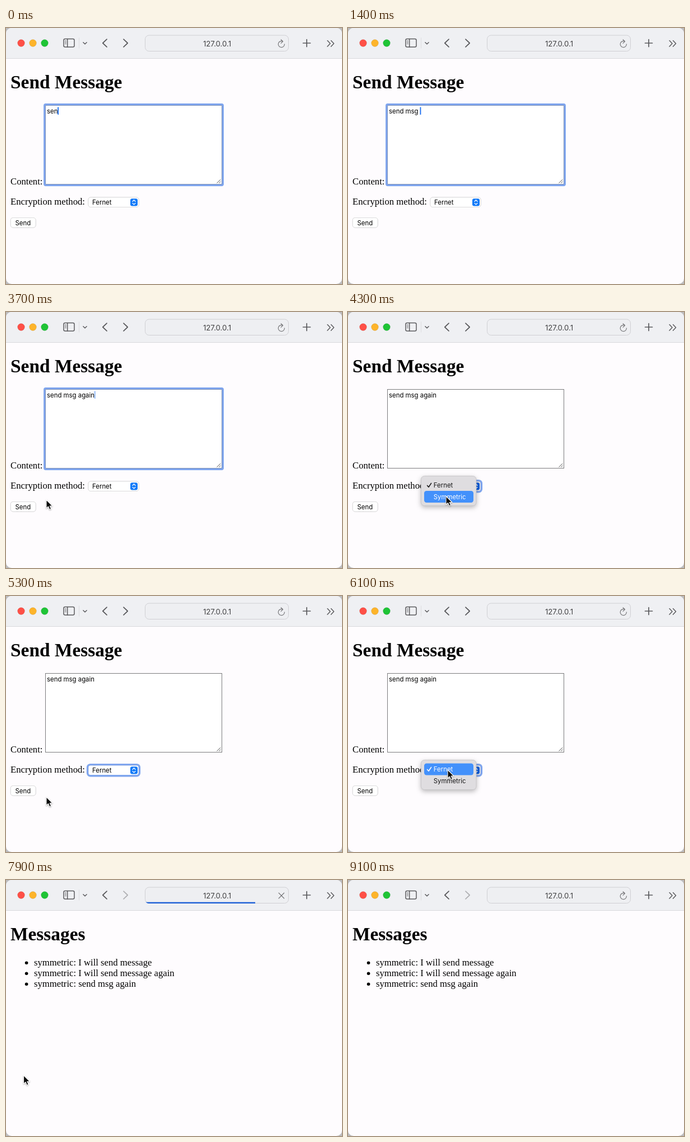
An HTML page for the animation above (9.8 s loop, 600x458 px).

```html
<!DOCTYPE html>
<html lang="en">
<head>
<meta charset="utf-8">
<title>Send Message</title>
<style>
  html, body { margin: 0; width: 100%; height: 100%; overflow: hidden; background: #bcbcbe; }
  svg { display: block; width: 600px; height: 458px; }
  .serif { font: 16.7px "Liberation Serif", Times, serif; }
  .title { font: bold 33.4px "Liberation Serif", Times, serif; }
  .ui { font: 11.4px Inter, Arial, sans-serif; }
  .url { font: 13.2px Inter, Arial, sans-serif; fill: #414143; }
  .icon { fill: none; stroke: #5b5b5e; stroke-width: 1.5; stroke-linecap: round; stroke-linejoin: round; }
  .ring { fill: none; stroke: #7fa5ee; stroke-width: 3.4; }
  .control { fill: #fff; stroke: #d9d8da; stroke-width: .8; filter: drop-shadow(0 .6px .5px #0003); }
</style>
</head>
<body>
<svg viewBox="0 0 600 458">
  <defs>
    <clipPath id="frame"><rect width="600" height="458" rx="10"/></clipPath>
    <clipPath id="field"><rect x="248" y="12.5" width="256.5" height="29.5" rx="7"/></clipPath>
  </defs>
  <g clip-path="url(#frame)">
    <rect width="600" height="458" fill="#fefcfe"/>
    <rect width="600" height="54" fill="#eff0f3"/>
    <rect y="54" width="600" height="1" fill="#d9d9dc"/>

    <g stroke="#0002" stroke-width=".6">
      <circle cx="27" cy="27" r="6.4" fill="#fe5047"/>
      <circle cx="48" cy="27" r="6.4" fill="#fdb42b"/>
      <circle cx="69" cy="27" r="6.4" fill="#1fc436"/>
    </g>
    <g class="icon">
      <rect x="103" y="19.5" width="19" height="14.5" rx="2.5"/>
      <path d="M109.7 19.5V34"/>
      <path d="M105.4 23h2M105.4 25.6h2M105.4 28.2h2" stroke-width="1"/>
      <path d="M130.5 17.5V36" stroke="#dddde0" stroke-width="1"/>
      <path d="M137.9 25.7L141 28.8L144.1 25.7"/>
      <path d="M180 20.2L172.8 27L180 33.8" stroke-width="1.8"/>
      <path id="forward" d="M210 20.2L217.2 27L210 33.8" stroke-width="1.8"/>
      <path d="M530.5 27H543.5M537 20.5V33.5" stroke-width="1.7"/>
      <path d="M574 22.5L579 27.8L574 33.1M580.5 22.5L585.5 27.8L580.5 33.1"/>
    </g>

    <rect x="248.5" y="13" width="256" height="28.5" rx="7" fill="#eeeff2" stroke="#cfcfd3"/>
    <g clip-path="url(#field)"><rect id="bar" x="248" y="39.6" height="2.4" fill="#1c5fd6"/></g>
    <text class="url" x="377" y="32.6" text-anchor="middle">127.0.0.1</text>
    <path id="reload" class="icon" stroke-width="1.2" style="stroke-width:1.2;stroke:#77777a"
      d="M494.2 23.9A5.6 5.6 0 1 0 497.4 28.8M491 20.8L494.5 24L491 27.2"/>
    <path id="stop" class="icon" style="stroke-width:1.2;stroke:#68686b" d="M487 23.2L496.6 32.8M496.6 23.2L487 32.8"/>

    <g id="form">
      <text class="title" x="8" y="107.6">Send Message</text>
      <text class="serif" x="8" y="280.4">Content:</text>
      <rect x="70.5" y="138.5" width="315" height="141" fill="#fff" stroke="#7b7b7d"/>
      <rect id="areaRing" class="ring" x="68.8" y="136.8" width="318.4" height="144.4" rx="2"/>
      <path d="M376.5 277.5L383.3 271M380.3 277.5L383.3 274.6" stroke="#555" stroke-width="1"/>
      <text id="typed" class="ui" x="73" y="152.8" xml:space="preserve"></text>
      <rect id="caret" y="141.5" width="1.8" height="13.5" fill="#176cf0"/>

      <text class="serif" x="8" y="316.2">Encryption method:</text>
      <rect id="select" class="control" x="147" y="303" width="90" height="17.5" rx="4.2"/>
      <rect id="selectRing" class="ring" x="145.6" y="301.6" width="92.8" height="20.2" rx="5"/>
      <text id="choice" class="ui" x="154" y="316">Fernet</text>
      <rect id="knob" x="222" y="305.2" width="13" height="13.2" rx="3.2"/>
      <path d="M226 310.2L228.5 307.8L231 310.2M226 313.4L228.5 315.8L231 313.4"
        fill="none" stroke="#fff" stroke-width="1.3" stroke-linecap="round" stroke-linejoin="round"/>

      <rect id="send" class="control" x="8.3" y="339.5" width="44.8" height="17.5" rx="4.2"/>
      <text class="ui" x="16.5" y="352.6">Send</text>

      <g id="menu">
        <rect x="130.5" y="293.5" width="98.5" height="53" rx="6" fill="#dfdde0" stroke="#c2c0c3" stroke-width=".8"
          style="filter:drop-shadow(0 3px 4px #0004)"/>
        <rect id="hover" x="136" width="88" height="21" rx="4.2" fill="#4391fb"/>
        <path id="tick" d="M141.6 310.4L144 313.2L148.6 306.4" fill="none" stroke-width="1.6"
          stroke-linecap="round" stroke-linejoin="round"/>
        <text id="item0" class="ui" x="152.8" y="313.9">Fernet</text>
        <text id="item1" class="ui" x="152.8" y="334.7">Symmetric</text>
      </g>
    </g>

    <g id="list">
      <text class="title" x="8" y="107.6">Messages</text>
      <g id="rows"></g>
    </g>

    <path id="mouse" d="M0 0V15.2L3.5 12L5.8 17.4L8.6 16.2L6.3 11H11Z" fill="#0a0a0a" stroke="#fff" stroke-width="1.1"
      stroke-linejoin="round" style="filter:drop-shadow(0 1px 1px #0005)"/>
  </g>
</svg>
<script>
const LOOP = 9800, STEP = 100;
const $ = id => document.getElementById(id);
const show = (id, on) => $(id).style.display = on ? "" : "none";
const fill = (id, color) => $(id).style.fill = color;

const message = "send msg again";
// When each character after "sen" appears.
const keys = [100, 300, 700, 1000, 1100, 1400, 1600, 1700, 1900, 2000, 2200];
// Pointer stops: time, x, y.
const path = [
  [2900, 32, 343], [3500, 50, 341], [3700, 72, 336], [4000, 178, 311], [4300, 175, 329.5],
  [4600, 175, 329.5], [4900, 135, 346], [5300, 72, 359.5], [5500, 22, 343], [5700, 22, 340],
  [6100, 178, 311], [6300, 175, 329.5], [6500, 175, 329.5], [6700, 5, 361.5], [7100, 5, 361.5],
  [7400, 31.5, 349.5], [8500, 31.5, 349.5], [8700, 80, 367], [9000, 431, 184]
];
const progress = [[7500, 20], [7700, 120], [7900, 197], [8000, 225], [8100, 256]];

["I will send message", "I will send message again", message].forEach((text, i) => {
  const y = 153 + i * 19;
  $("rows").innerHTML += `<circle cx="36.6" cy="${y - 4.8}" r="2.8"/>` +
    `<text class="serif" x="50" y="${y}">symmetric: ${text}</text>`;
});

const within = (t, a, b) => t >= a && t < b;

function sample(stops, t) {
  const i = stops.findIndex(s => s[0] >= t);
  if (i < 0) return stops.at(-1).slice(1);
  if (i === 0) return stops[0].slice(1);
  const a = stops[i - 1], b = stops[i];
  const k = (t - a[0]) / (b[0] - a[0]);
  return a.slice(1).map((v, n) => v + (b[n + 1] - v) * k);
}

function caretOpacity(t) {
  if (t < 2600) return 1;
  const phase = (t - 2600) % 1000;
  if (phase < 300) return .75 - phase / 400;
  if (phase < 500) return 0;
  return Math.min(1, (phase - 400) / 300);
}

function drawForm(t) {
  const focused = t < 4000;
  const open = within(t, 4000, 4600) || within(t, 6100, 6700);
  const pressed = open || within(t, 4600, 4700) || within(t, 6700, 6800);
  $("typed").textContent = message.slice(0, 3 + keys.filter(k => k <= t).length);
  $("caret").setAttribute("x", 73 + $("typed").getComputedTextLength() - .2);
  $("caret").style.opacity = focused ? caretOpacity(t) : 0;
  show("areaRing", focused);
  show("selectRing", !focused);
  $("choice").textContent = t < 6800 ? "Fernet" : "Symmetric";
  fill("select", pressed ? "#ebeaec" : "#fff");
  fill("knob", pressed ? "#0b5bd8" : "#127af8");
  fill("send", within(t, 7400, 7600) ? "#e6e5e7" : "#fff");

  show("menu", open);
  const second = within(t, 4200, 4600) || t >= 6300;
  $("hover").setAttribute("y", second ? 320 : 299.5);
  fill("item0", second ? "#161616" : "#fff");
  fill("item1", second ? "#fff" : "#161616");
  $("tick").style.stroke = second ? "#161616" : "#fff";
}

function draw(t) {
  const sent = t >= 7700, loading = within(t, 7500, 8200);
  show("form", !sent);
  show("list", sent);
  if (!sent) drawForm(t);
  $("forward").style.stroke = sent ? "#b1b1b4" : "#5b5b5e";
  show("reload", !loading);
  show("stop", loading);
  $("bar").setAttribute("width", loading ? sample(progress, t)[0] : 0);
  show("mouse", within(t, 2900, 9100));
  $("mouse").setAttribute("transform", `translate(${sample(path, t)})`);
}

const start = performance.now();
let last = -1;
function tick() {
  const t = Math.floor(((performance.now() - start) % LOOP) / STEP) * STEP;
  if (t !== last) draw(last = t);
  requestAnimationFrame(tick);
}
tick();
</script>
</body>
</html>
```
